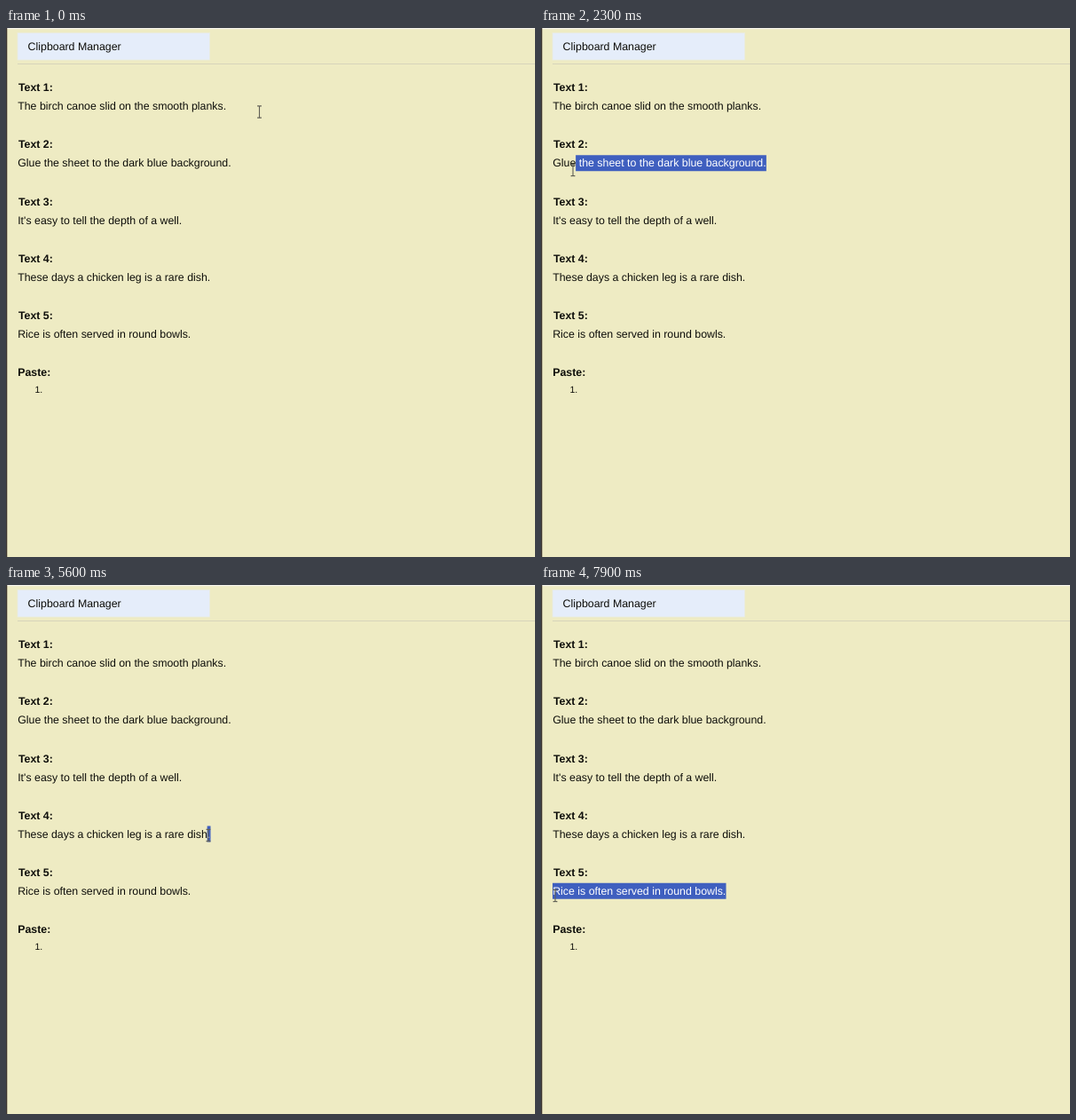
An HTML page that plays this animation: 596x596 px, repeating every 8000 ms.

```html
<!DOCTYPE html>
<html lang="en">
<head>
<meta charset="utf-8">
<title>Clipboard Manager</title>
<style>
  html, body { margin: 0; width: 100%; height: 100%; overflow: hidden; background: #eeebc3; }
  svg { display: block; width: 596px; height: 596px; }
  text {
    font: 12.36px "Liberation Sans", Arial, sans-serif;
    fill: #0e0e0a;
    text-rendering: geometricPrecision;
    white-space: pre;
  }
  .label { font-weight: bold; }
  .number { font-size: 10.6px; }
  .selected { fill: #fff; }
  #cursor { fill: none; stroke: #605f55; stroke-width: 1.1; }
</style>
</head>
<body>
<svg viewBox="0 0 596 596">
  <defs><clipPath id="clip"><rect id="clipBox" height="18"/></clipPath></defs>
  <rect width="596" height="596" fill="#eeebc3"/>
  <rect width="596" height="1.2" fill="#f6f5ec"/>
  <rect width="1.3" height="596" fill="#37302c"/>
  <rect x="13" y="5.5" width="216.5" height="30.5" fill="#e5edfa" stroke="#e9ecdf" stroke-width=".8"/>
  <rect x="13" y="40" width="583" height="1" fill="#d6d4bb"/>
  <text x="24.6" y="25">Clipboard Manager</text>
  <g id="page"></g>
  <text class="label" x="13.2" y="392.2">Paste:</text>
  <text class="number" x="32.4" y="411">1.</text>
  <g id="selection" clip-path="url(#clip)">
    <rect width="596" height="596" fill="#3f5fbf"/>
    <text class="selected" id="selectedText" x="13.2"></text>
  </g>
  <path id="cursor" d="M-2.4-6.6H-.7L0-6L.7-6.6H2.4M0-6V6M-2.4 6.6H-.7L0 6L.7 6.6H2.4"/>
</svg>
<script>
const LOOP = 8000, STEP = 100, LEFT = 13.2, PITCH = 64.2;
const TRAVEL = 800, PAUSE = 100; // move to the next line, then wait before pressing
const REST_X = 16;               // where every drag ends

// One drag per sentence: press and release time, pointer start and height
const drags = [
  { text: "The birch canoe slid on the smooth planks.", down: 0, up: 900, x: 285.5, y: 94.5 },
  { text: "Glue the sheet to the dark blue background.", down: 1800, up: 2400, x: 286, y: 160 },
  { text: "It's easy to tell the depth of a well.", down: 3800, up: 4500, x: 216.5, y: 217 },
  { text: "These days a chicken leg is a rare dish.", down: 5540, up: 6200, x: 233, y: 282 },
  { text: "Rice is often served in round bowls.", down: 7200, up: 7800, x: 229, y: 350 }
];

const $ = id => document.getElementById(id);
const baseline = i => 92.2 + i * PITCH;
const lerp = (a, b, k) => a + (b - a) * k;

function ease(t, start, end) {
  const k = Math.min(1, Math.max(0, (t - start) / (end - start)));
  return k * k * (3 - 2 * k);
}

function addText(content, x, y, cls = "") {
  const el = document.createElementNS("http://www.w3.org/2000/svg", "text");
  el.setAttribute("x", x);
  el.setAttribute("y", y);
  el.setAttribute("class", cls);
  el.textContent = content;
  $("page").append(el);
  return el;
}

// Caret positions between the letters of each sentence
drags.forEach((drag, i) => {
  addText(`Text ${i + 1}:`, LEFT + 0.7, 71.2 + i * PITCH, "label");
  const el = addText(drag.text, LEFT, baseline(i));
  drag.carets = [LEFT, ...Array.from(drag.text, (_, c) => el.getEndPositionOfChar(c).x)];
});

function pointerAt(t, i) {
  const drag = drags[i], next = drags[i + 1];
  const x = lerp(drag.x, REST_X, ease(t, drag.down, drag.up));
  if (!next) return [x, drag.y];
  const arrive = next.down - PAUSE;
  const k = ease(t, arrive - TRAVEL, arrive);
  return [lerp(x, next.x, k), lerp(drag.y, next.y, k)];
}

const nearest = (stops, x) =>
  stops.reduce((best, s) => Math.abs(s - x) < Math.abs(best - x) ? s : best);

function showSelection(t, i, x) {
  const { text, up, carets } = drags[i];
  const start = t < up ? nearest(carets, x) : LEFT;
  const end = carets[carets.length - 1];
  $("clipBox").setAttribute("x", start - 0.2);
  $("clipBox").setAttribute("y", baseline(i) - 13.2);
  $("clipBox").setAttribute("width", start < end ? end - start + 0.4 : 0);
  $("selectedText").setAttribute("y", baseline(i));
  $("selectedText").textContent = text;
}

function draw() {
  const t = Math.floor(performance.now() % LOOP / STEP) * STEP;
  const i = drags.filter(drag => drag.down <= t).length - 1;
  const [x, y] = pointerAt(t, i);
  $("cursor").setAttribute("transform", `translate(${x} ${y})`);
  showSelection(t, i, x);
  requestAnimationFrame(draw);
}
draw();
</script>
</body>
</html>
```
